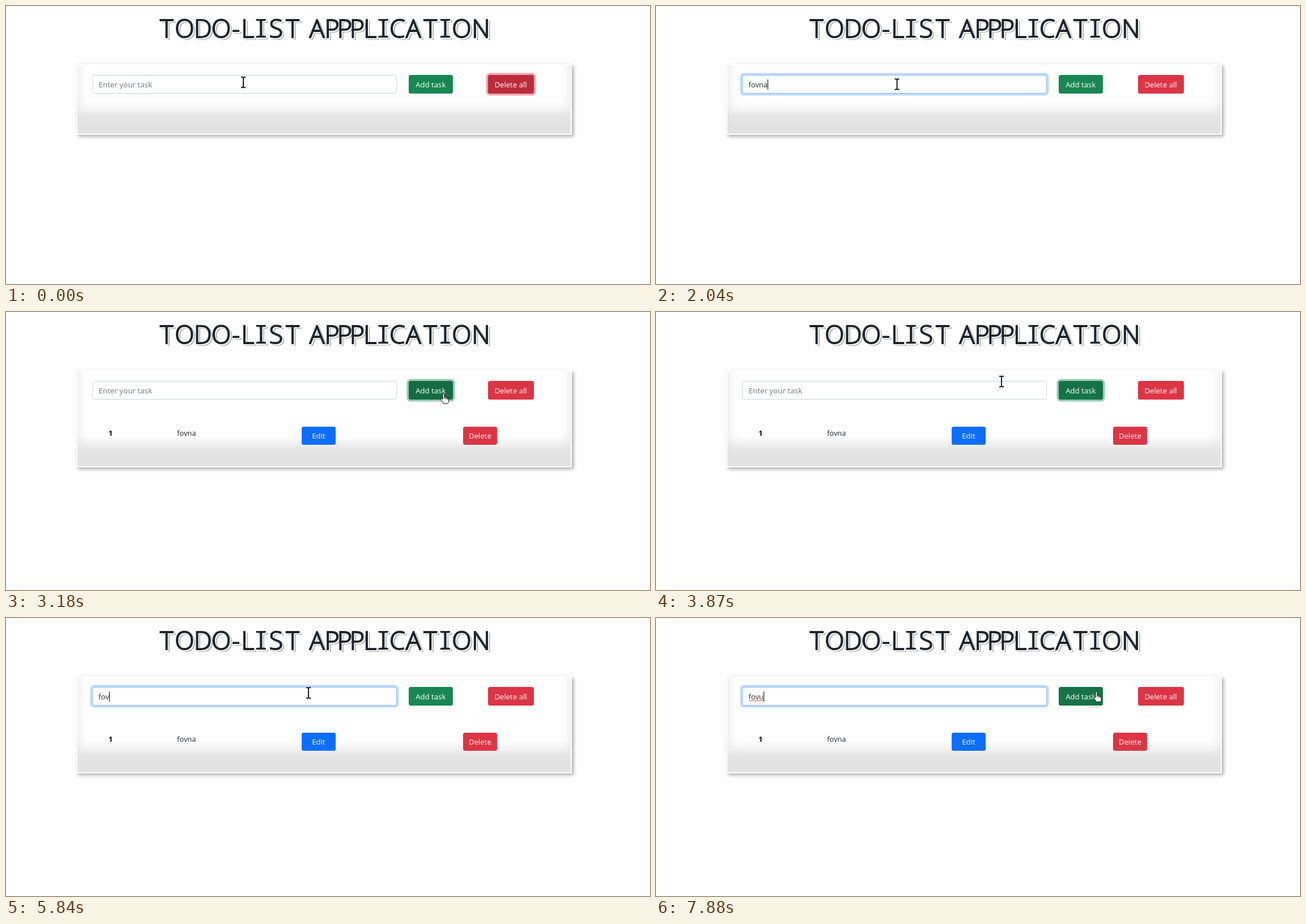
Recreate the animation shown at these times as an HTML page. Size 1137x492 px, loop 8000 ms.

```html
<!DOCTYPE html>
<html lang="en">
<head>
<meta charset="utf-8">
<title>Todo list</title>
<style>
  html, body { margin: 0; width: 100%; height: 100%; overflow: hidden; background: #fefefe; }
  body { position: relative; font: 12.9px/32.5px "Open Sans", "Noto Sans", sans-serif; color: #212529; }
  body > *, .abs { position: absolute; box-sizing: border-box; white-space: pre; }
  svg { overflow: visible; }
  #title { left: 0; top: 0; width: 1137px; height: 90px; }
  #title text {
    font: 300 45px "Open Sans", "Noto Sans", sans-serif;
    text-anchor: middle; fill: currentColor; stroke: currentColor;
    stroke-width: 1.8; stroke-linejoin: round;
  }
  #title .slab { font-family: "Noto Sans Mono", "DejaVu Sans Mono", monospace; stroke-width: .2; }
  #panel {
    left: 124px; top: 103px; width: 875px; height: 125px;
    border: 2px solid #fff; border-top-color: transparent;
    box-shadow: 3px 3px 6px rgba(0, 0, 0, .33), inset 0 -40px 20px rgba(0, 0, 0, .11);
  }
  #panel.filled { height: 172px; }
  #field {
    left: 152px; top: 122px; width: 538px; height: 33px; padding: 1px 0 0 10.5px;
    background: #fff; border: 1px solid; border-radius: 3.5px; line-height: 31px;
  }
  #hint { left: 10.5px; top: 1px; color: #6c757d; font-size: 13.4px; }
  #value { position: relative; display: inline-block; vertical-align: top; height: 31px; }
  #caret { left: 100%; top: 6px; width: 1px; height: 18px; background: #000; }
  #spelling { left: 0; top: 20.5px; width: 100%; height: 3px; overflow: hidden; }
  .button {
    top: 122px; height: 32.5px; padding-top: .5px; border-radius: 3.5px;
    color: #fff; text-align: center; font-size: 13.2px;
  }
  #add { left: 710.5px; width: 78.5px; }
  #clear { left: 850.5px; width: 81px; }
  #row { left: 0; top: 202.5px; }
  #row .button { top: 0; width: 60px; }
  #pointer { left: 0; top: 0; width: 1px; height: 1px; }
</style>
</head>
<body>
<svg id="title" role="img" aria-label="TODO-LIST APPPLICATION"></svg>
<div id="panel"></div>
<div id="field"><span id="hint" class="abs">Enter your task</span><span id="value"><span id="text"></span><span id="caret" class="abs"></span><svg id="spelling" class="abs"><defs><pattern id="wave" width="4" height="3" patternUnits="userSpaceOnUse"><path d="M-1 3L2 .5 5 3" fill="none" stroke="#e0333c"/></pattern></defs><rect width="100%" height="3" fill="url(#wave)"/></svg></span></div>
<div id="add" class="button">Add task</div>
<div id="clear" class="button">Delete all</div>
<div id="row">
  <b class="abs" style="left:181px;top:-5px;color:#000">1</b>
  <span class="abs" style="left:302px;top:-5px">fovna</span>
  <div class="abs button" style="left:522px;background:#0d6efd">Edit</div>
  <div class="abs button" style="left:807px;background:#dc3545">Delete</div>
</div>
<svg id="pointer">
  <path id="beam" d="M-4-9.3H-1.5L0-8.3 1.5-9.3H4M0-8.3V8.3M-4 9.3H-1.5L0 8.3 1.5 9.3H4" fill="none" stroke="#111" stroke-width="1.9"/>
  <path id="hand" d="M-1.5 11V1.5Q-1.5 0 0 0T1.5 1.5V7Q4 6 4.4 8Q6.4 7 6.8 9Q8.8 8.5 8.8 10.5V14Q8.8 17 7 18.6H0Q-1 16-4 13Q-5.6 10.5-4.3 9.8Q-3 9.3-1.5 11ZM1.5 7V10.5M4.4 8V11M6.8 9V11.5" fill="#fff" stroke="#000"/>
  <path id="arrow" d="M0 0V16L3.8 12.5 6.3 18 8.8 17 6.4 11.5H11.5Z" fill="#fff" stroke="#000"/>
</svg>
<script>
const LOOP = 8000;
const el = id => document.getElementById(id);

// Letter pitch in em; each letter is centred on its slot.
const pitch = { T: .68, O: .8, D: .72, '-': .42, L: .55, I: .55, S: .69, ' ': .3, A: .73, P: .52, C: .6, N: .8 };

function titleMarkup(offset, color) {
  let x = 269 + offset;
  const letters = [...'TODO-LIST APPPLICATION'].map(c => {
    const width = pitch[c] * 42.7, center = x + width / 2;
    x += width;
    return `<tspan x="${center.toFixed(1)}"${c === 'I' ? ' class="slab"' : ''}>${c}</tspan>`;
  });
  return `<text y="${56 + offset}" style="color:${color}">${letters.join('')}</text>`;
}
el('title').innerHTML =
  titleMarkup(3.4, '#a8a8a8') + titleMarkup(1.9, '#fff') + titleMarkup(0, '#212529');

// Each track holds its value from the given time on.
const tracks = {
  field: [[0, 0], [80, .5], [160, 1], [3010, .7], [3080, .25], [3180, 0], [4500, .5], [4580, .9], [4680, 1]],
  add: [[0, 0], [3010, .3], [3080, .7], [3180, 1], [4500, .5], [4580, 0]],
  clear: [[0, 1], [80, .5], [160, 0]],
  addColor: [[0, '#198754'], [2420, '#157347'], [3010, '#146c43'], [3250, '#157347'], [4500, '#198754'], [7800, '#157347']],
  clearColor: [[0, '#bb2d3b'], [80, '#cc3140'], [160, '#dc3545']],
  text: [[0, ''], [930, 'f'], [1090, 'fo'], [1420, 'fov'], [1570, 'fovn'], [1640, 'fovna'], [3180, ''],
    [5250, 'f'], [5430, 'fo'], [5840, 'fov'], [6830, 'fovu']],
  caret: [[0, 0], [80, 1], [570, 0], [930, 1], [2110, 0], [2690, 1], [3010, 0], [4500, 1], [5070, 0],
    [5250, 1], [6340, 0], [6830, 1], [7340, 0], [7800, 1]],
  spelling: [[0, 0], [2690, 1], [3010, 0], [7490, 1]],
  filled: [[0, 0], [3180, 1]],
  pointer: [[0, ['beam', 419, 135]],
    ...moves(2040, 2500, 'beam 425.5 138.5, beam 455 143, beam 520 149, beam 620 152, arrow 698 152, hand 755 150, hand 772.5 143.5'),
    ...moves(3430, 4200, 'hand 768 142, hand 750 139, hand 720 134, arrow 695 128, beam 655 124, beam 610 123, beam 580 124, beam 560 126, beam 545 129, beam 538 131, beam 534 132.5'),
    ...moves(7260, 7880, 'beam 535 132.5, beam 570 125, arrow 640 112, arrow 730 102, arrow 790 99, arrow 818 108, arrow 806 122, hand 786 129, hand 777.5 130')]
};

// Spreads pointer positions evenly between two times.
function moves(start, end, path) {
  return path.split(', ').map((step, i, all) => {
    const [shape, x, y] = step.split(' ');
    return [Math.floor((start + (end - start) * i / (all.length - 1)) / 10) * 10, [shape, x, y]];
  });
}

const valueAt = (track, t) => track.findLast(([start]) => start <= t)[1];
const show = (id, on) => { el(id).style.visibility = on ? 'visible' : 'hidden'; };

function ring(id, level, rgb, alpha) {
  el(id).style.boxShadow = level ? `0 0 0 ${3.5 * level}px rgba(${rgb}, ${alpha * level})` : 'none';
}

function draw(t) {
  const now = {};
  for (const name in tracks) now[name] = valueAt(tracks[name], t);

  ring('field', now.field, '13, 110, 253', .25);
  ring('add', now.add, '60, 153, 110', .5);
  ring('clear', now.clear, '225, 83, 97', .5);
  el('field').style.borderColor = `color-mix(in srgb, #86b7fe ${now.field * 100}%, #ced4da)`;
  el('add').style.background = now.addColor;
  el('clear').style.background = now.clearColor;

  el('text').textContent = now.text;
  show('hint', !now.text);
  show('caret', now.caret);
  show('spelling', now.spelling);
  show('row', now.filled);
  el('panel').classList.toggle('filled', !!now.filled);

  const [shape, x, y] = now.pointer;
  for (const id of ['beam', 'hand', 'arrow']) show(id, id === shape);
  el('pointer').style.transform = `translate(${x}px, ${y}px)`;
}

const begin = performance.now();
function tick() {
  draw((performance.now() - begin) % LOOP);
  requestAnimationFrame(tick);
}
tick();
</script>
</body>
</html>
```
